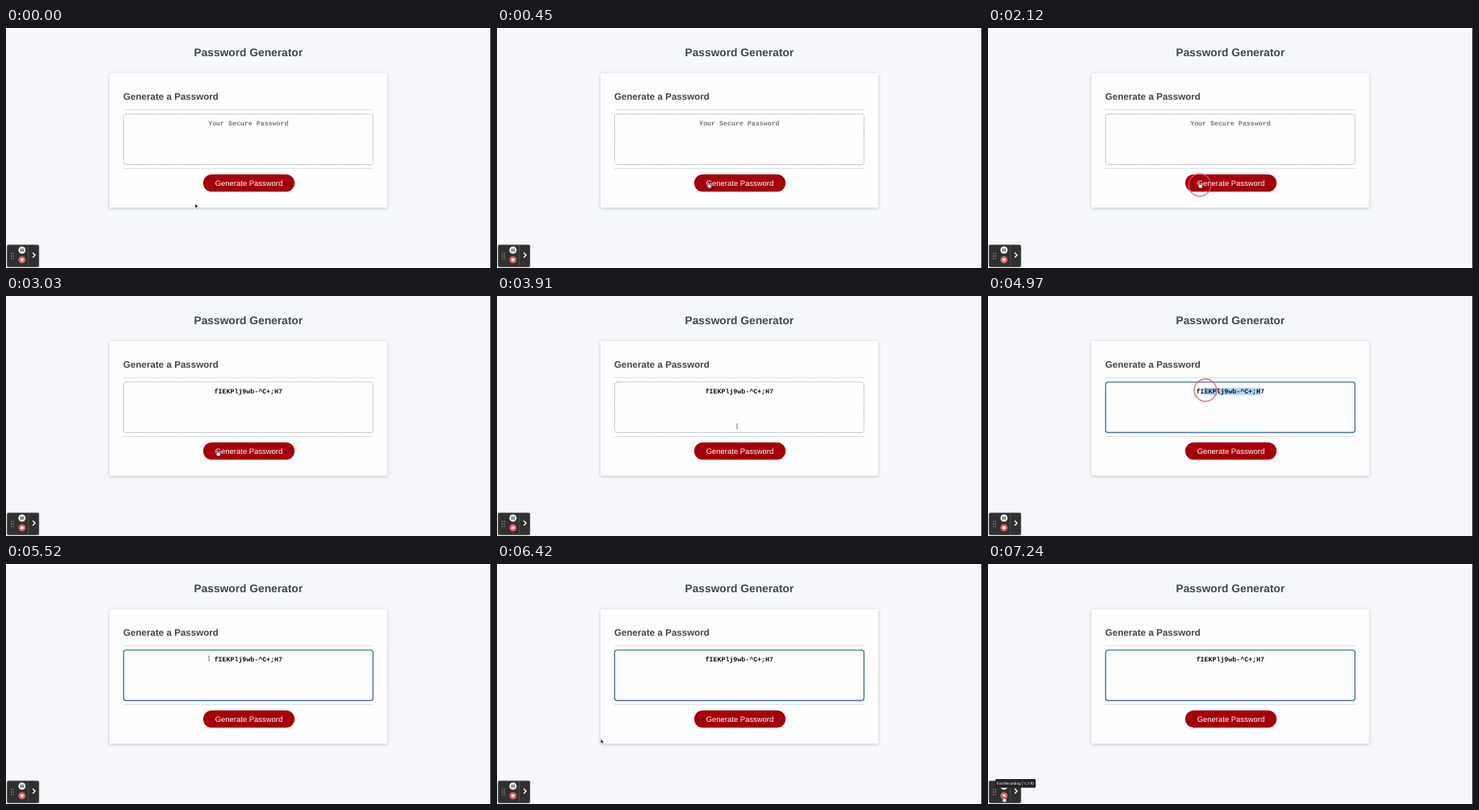
An HTML page for the animation above (7270 ms loop, 600 px wide and 298 px high).

```html
<!DOCTYPE html>
<html lang="en">
<head>
<meta charset="utf-8">
<title>Password Generator</title>
<style>
  html, body { margin: 0; width: 100%; height: 100%; overflow: hidden; background: #f6f8fb; }
  svg { display: block; width: 100vw; height: 100vh; }
  text { font-family: "Liberation Sans", Arial, sans-serif; text-rendering: geometricPrecision; white-space: pre; }
  .head { font-weight: bold; fill: #41474e; }
  .mono { font: bold 8.28px "Liberation Mono", "Courier New", monospace; }
  .mid { text-anchor: middle; }
  .card { fill: #fefefe; filter: drop-shadow(0 1px 2px rgba(40, 50, 60, .25)); }
</style>
</head>
<body>
<svg viewBox="0 0 600 298" preserveAspectRatio="none">
  <rect width="600" height="298" fill="#f6f8fb"/>
  <rect x="599" width="1" height="298" fill="#3c3e42"/>
  <text class="head mid" x="299.8" y="35" font-size="13.75">Password Generator</text>

  <rect class="card" x="128" y="56" width="343.5" height="167" rx="1.5"/>
  <text class="head" x="145" y="89.2" font-size="11.6">Generate a Password</text>
  <path d="M145 101.5H454.500M145 174.500H454.500" stroke="#dfe1e4"/>
  <rect id="field" x="145.5" y="106.900" width="308.500" height="62.600" rx="3" fill="#fefefe"/>
  <rect id="selection" y="114" height="9" fill="#b2d5fb"/>
  <text id="value" class="mono mid" x="299.800" y="121.300"></text>
  <rect x="244" y="181.700" width="113" height="21.600" rx="10.800" fill="#a3000a"/>
  <text class="mid" x="300.500" y="195.800" font-size="9.450" fill="#fff">Generate Password</text>

  <g id="recorder">
    <rect x="1" y="269" width="40" height="28" rx="2" fill="#303030" stroke="#b9babc" stroke-width=".6"/>
    <path d="M6.700 279.500v8M9.300 279.500v8" stroke="#bbb" stroke-width="1.100" stroke-dasharray="1.100 2"/>
    <circle cx="19.800" cy="275.800" r="4.500" fill="#f4f4f4"/>
    <path d="M18.600 273.800v4M21 273.800v4" stroke="#333" stroke-width="1.200"/>
    <circle cx="19.800" cy="287.700" r="4.500" fill="#dc5a62"/>
    <rect x="18" y="285.900" width="3.600" height="3.600" rx=".6" fill="#fff"/>
    <path d="M27.500 270v26" stroke="#6a5050" stroke-width=".7"/>
    <path d="M33 279l3 3-3 3" fill="none" stroke="#fff" stroke-width="1.400"/>
  </g>
  <g id="tip">
    <rect x="9" y="267" width="50" height="10.800" rx="1.500" fill="#242424"/>
    <text class="mid" x="34" y="274" font-size="4.600" fill="#fff" style="font-family:Roboto,'DejaVu Sans',sans-serif">End Recording (⌥⇧R)</text>
  </g>

  <circle id="ring" fill="none" stroke="#e2565f" stroke-width="1.700"/>
  <g id="cursor" stroke-linejoin="round">
    <path id="arrow" d="M0 0v5.600l1.300-1.200.9 2.100 1-.4-.9-2h1.800z" fill="#111" stroke="#fff" stroke-width=".5"/>
    <path id="hand" d="M-1-3.200q.7-.8 1.300 0v2.200l2.700.8q.5.300.4 1l-.5 3h-3.400l-2-2.800q0-.9.900-.6l.6.500z" fill="#fff" stroke="#222" stroke-width=".6"/>
    <path id="beam" d="M-1.400-3.300q1.400 0 1.400.8v5q0 .8-1.400.8M1.400-3.300q-1.400 0-1.400.8v5q0 .8 1.400.8" fill="none" stroke="#777" stroke-width=".6"/>
  </g>
</svg>
<script>
const LOOP = 7270, CHAR = 4.97, TEXT_X = 257.6;
const el = id => document.getElementById(id);
const set = (id, attrs) => { for (const k in attrs) el(id).setAttribute(k, attrs[k]); };
const show = (id, on) => set(id, { visibility: on ? 'visible' : 'hidden' });
const ramp = (t, a, b) => Math.min(1, Math.max(0, (t - a) / (b - a)));

// Pointer stops: time, x, y
const path = [
  [0, 234, 218], [30, 234, 218], [450, 262, 195], [3330, 262, 195],
  [3880, 297, 162], [4060, 297, 162], [4560, 339, 117], [4640, 339, 117],
  [4760, 318, 117], [4970, 269, 117], [5200, 251, 117], [5520, 251, 117],
  [6030, 242, 190], [6240, 242, 190], [6420, 128.500, 217], [6900, 19.500, 292], [LOOP, 19.500, 292]
];

// Clicks: press, grown, release, gone
const clicks = [[1420, 1580, 2550, 3030], [4560, 4720, 5200, 5450]];

function pointer(t) {
  const i = path.findIndex(p => p[0] > t);
  const [a, b] = [path[i - 1], path[i]];
  const k = ramp(t, a[0], b[0]);
  return [a[1] + (b[1] - a[1]) * k, a[2] + (b[2] - a[2]) * k];
}

function shape(x, y) {
  if (x > 145 && x < 454 && y > 107 && y < 170) return 'beam';
  const onButton = x > 244 && x < 357 && y > 182 && y < 203;
  return onButton || (x < 41 && y > 280) ? 'hand' : 'arrow';
}

function draw(t) {
  const [x, y] = pointer(t);
  const kind = shape(x, y);
  set('cursor', { transform: `translate(${x} ${y})` });
  for (const id of ['arrow', 'hand', 'beam']) show(id, id === kind);

  const click = clicks.find(c => t >= c[0] && t < c[3]);
  show('ring', click);
  if (click) {
    const [press, grown, release, gone] = click;
    set('ring', {
      cx: x, cy: y,
      r: 9 + 4.800 * ramp(t, press, grown),
      opacity: .75 * (1 - ramp(t, release, gone))
    });
  }

  const filled = t >= 2550, focused = t >= 4560;
  el('value').textContent = filled ? 'fIEKPlj9wb-^C+;H7' : 'Your Secure Password';
  set('value', { fill: filled ? '#111' : '#777' });
  set('field', {
    stroke: focused ? '#3f72b4' : '#a4a7ab',
    'stroke-width': focused ? 1.400 : .9,
    'stroke-dasharray': focused ? 'none' : '2 1'
  });

  const selecting = t >= 4640 && t < 5520;
  const first = Math.min(16, Math.max(0, Math.round((x - TEXT_X) / CHAR)));
  show('selection', selecting);
  if (selecting) set('selection', { x: TEXT_X + first * CHAR, width: (16 - first) * CHAR });

  show('tip', t >= 7000);
}

function tick(now) {
  draw(now % LOOP);
  requestAnimationFrame(tick);
}
draw(0);
requestAnimationFrame(tick);
</script>
</body>
</html>
```
